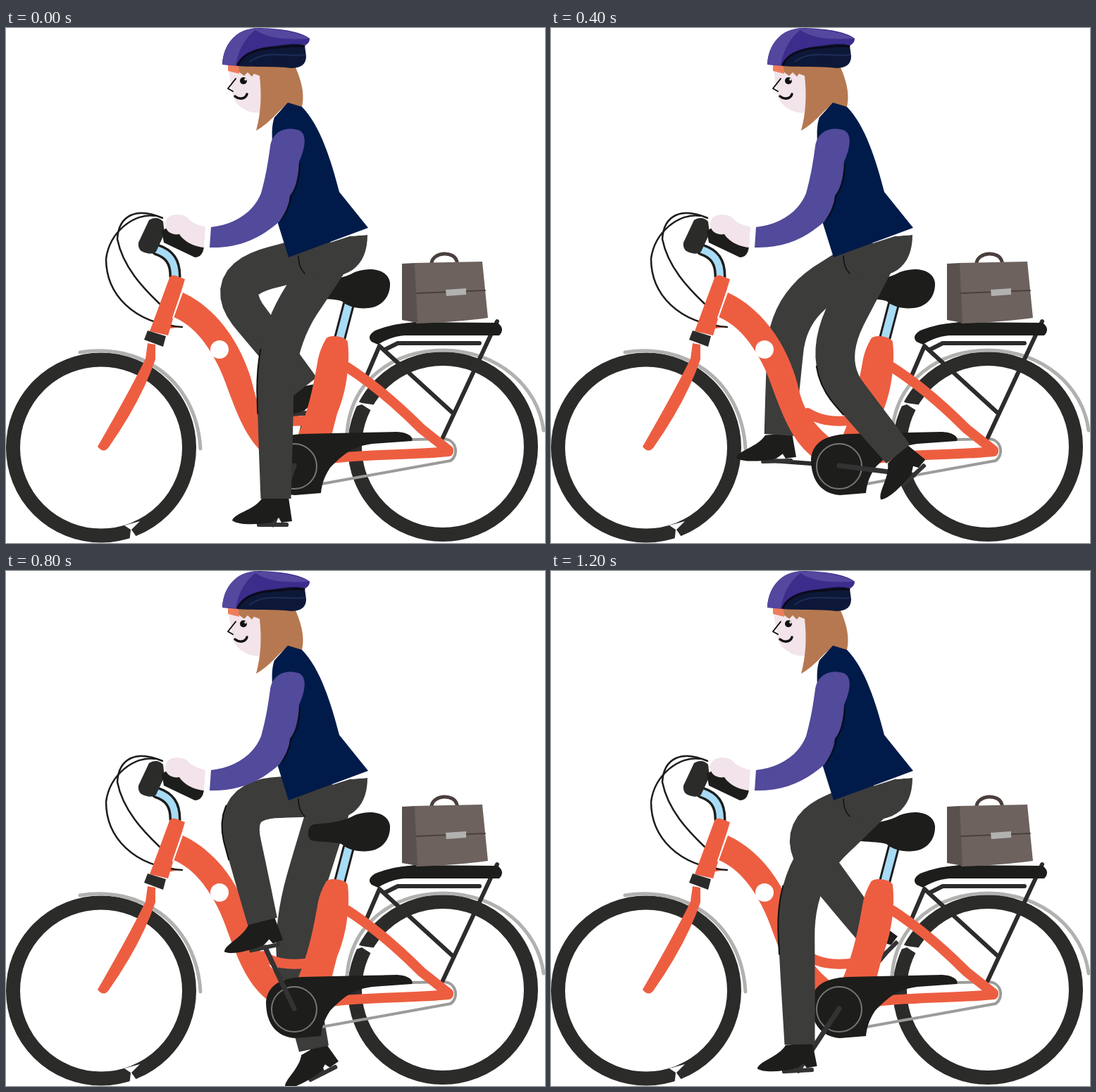
These frames come from a looping animation (765 by 732 pixels, 1250 ms). An HTML page:

```html
<!DOCTYPE html>
<html lang="en">
<head>
<meta charset="utf-8">
<title>Cyclist</title>
<style>
  html, body { margin: 0; height: 100%; overflow: hidden; background: #fff; }
  svg { display: block; width: 765px; height: 732px; }
  .line { fill: none; stroke-linecap: round; stroke-linejoin: round; }
  .trousers { fill: #3c3c3b; }
  .orange { fill: #ed5e41; }
  .black { fill: #1d1d1b; }
</style>
</head>
<body>
<svg viewBox="0 0 765 732">
  <defs>
    <g id="shoe">
      <rect x="-27" y="34" width="45" height="6" rx="2" fill="#333"/>
      <path class="black" d="M-20 0L18 -2L23 32L8 34L4 27L-6 34C-28 37-53 38-62 31C-58 20-32 17-20 0Z"/>
    </g>
  </defs>

  <!-- wheels and mudguards -->
  <g class="line" stroke="#2b2b2a" stroke-width="20">
    <circle cx="135" cy="596.500" r="125"/>
    <circle cx="620" cy="595" r="125"/>
  </g>
  <path fill="#fff" d="M168 707L190 701L178 713L185 723L175 732L177 713ZM492 528L505 533L526 536L519 544L505 535L490 540Z"/>
  <g class="line" stroke="#b1b1b0" stroke-width="5">
    <path d="M105 461C187 447 270 497 276 598"/>
    <path d="M484 575C490 500 550 458 622 458C700 460 755 510 763 572"/>
  </g>

  <g id="far"><path class="line crank" stroke="#2b2b2a" stroke-width="6"/><use href="#shoe"/><path class="trousers leg"/></g>

  <!-- chain, rack and bag -->
  <path class="line" stroke="#9b9b9a" stroke-width="4" d="M575 585L620 584C640 584 643 607 631 615L448 648"/>
  <g class="line" stroke="#2e2b2b" stroke-width="6">
    <path d="M530 452L512 494M530 452L635 548M697 417L620 582M538 457L556 448L672 448"/>
  </g>
  <path class="black" d="M519 446Q511 438 524 430C550 420 565 420 580 418L698 419Q709 428 700 437L565 437C550 438 535 445 528 450Z"/>
  <path class="line" stroke="#4a3f3d" stroke-width="5" d="M604 334C606 318 636 316 640 332"/>
  <path fill="#6d625e" d="M579 334L676 332L684 412Q640 418 582 420Z"/>
  <path fill="#5a514e" d="M562 335L580 334L584 419L562 415Z"/>
  <path class="line" stroke="#4a403e" stroke-width="2" d="M582 377L680 373"/>
  <path fill="#b1b1b0" d="M624 372L653 370L653 379L625 381Z"/>

  <!-- frame -->
  <g class="line" stroke="#ed5e41" stroke-width="14">
    <path d="M484 482C520 505 560 540 590 570L628 600"/>
    <path d="M462 612C520 605 580 607 628 602"/>
    <path d="M364 547C382 558 400 560 424 558"/>
  </g>
  <path class="orange" d="M251 376C295 396 328 440 345 490C355 518 352 545 395 582L374 612C345 590 332 560 314 511C300 470 275 426 238 411Z"/>
  <g class="line">
    <path stroke="#1d1d1b" stroke-width="17" d="M486 394L474 440"/>
    <path stroke="#a8dbf5" stroke-width="11" d="M486 394L474 440"/>
  </g>
  <path class="orange" d="M454 442C458 435 482 438 485 446C489 480 482 520 470 548L462 579L414 580C430 540 436 510 443 470Q446 456 454 442Z"/>
  <circle cx="303" cy="457" r="13" fill="#fff"/>
  <path class="black" d="M437 360C427 362 426 380 434 383C450 386 462 384 476 388C485 396 500 400 515 398C535 396 546 380 545 362C543 345 520 338 495 347C480 356 460 358 437 360Z"/>
  <path class="black" d="M369 612C372 588 390 579 420 577L555 574C572 575 579 582 576 587L520 591C490 595 478 607 460 625C450 640 448 652 447 661L410 664C385 662 369 645 369 612Z"/>
  <circle class="line" cx="409" cy="623" r="32" stroke="#777" stroke-width="2"/>

  <!-- steering -->
  <path class="orange" d="M229 420L248 425L227 428Z"/>
  <g class="line" stroke="#1d1d1b" stroke-width="2.500">
    <path d="M212 267C182 262 147 290 142 328C142 378 180 420 250 425"/>
    <path d="M222 270C185 254 160 266 158 300C166 340 195 370 218 392"/>
    <path stroke-width="17" d="M214 315C232 321 240 332 240 353"/>
    <path stroke="#a8dbf5" stroke-width="10" d="M214 315C232 321 240 332 240 353"/>
  </g>
  <path class="orange" d="M232 355Q235 350 241 352L254 357L230 437L204 431Z"/>
  <path class="line" stroke="#fff" stroke-width="2" d="M249 377L237 412"/>
  <path class="orange" d="M201 448L212 450L212 471Q192 530 145 597Q138 605 130 595Q176 515 198 470Z"/>
  <path fill="#2b2b2a" d="M201 430L227 438L223 453L196 443ZM203 273Q214 266 223 275L225 292L213 318Q206 324 192 317Q187 313 188 305Z"/>
  <path class="black" d="M221 288L240 278L281 311Q279 326 268 326L224 305Z"/>

  <g id="near"><path class="line crank" stroke="#333" stroke-width="7"/><use href="#shoe"/><path class="trousers leg"/><path class="line edge" stroke="#111" stroke-width="2"/></g>

  <!-- rider -->
  <path class="trousers" d="M401 324L488 296L513 294C513 325 500 346 472 352C445 352 425 350 416 345Z"/>
  <path class="line" stroke="#111" stroke-width="1.500" d="M415 324Q415 340 424 349"/>
  <path fill="#fff" d="M514 284L513 294L488 296Z"/>
  <path fill="#f2e4ea" d="M228 272C232 264 250 263 258 270C262 276 272 280 283 283L281 312C262 310 250 300 246 293C230 296 222 282 228 272Z"/>
  <path fill="#f2e4ea" d="M316 60L322 98C328 112 345 123 362 120L366 60Z"/>
  <path fill="#b67850" d="M330 52L410 54C422 80 424 100 419 116L400 108C385 118 375 135 355 146C362 120 363 95 360 68L352 65L349 69L343 63L338 68L330 62Z"/>
  <path fill="#ee7d5c" d="M315 52L330 52L331 65L315 61Z"/>
  <path fill="#001b49" d="M378 165C377 145 378 135 381 127L400 106L420 112C446 138 462 190 473 233L514 284L401 326L386 278Z"/>
  <path class="line" stroke="#080f20" stroke-width="4" d="M416 194C416 212 411 228 404 238Q402 255 390 272"/>
  <path fill="#524a9a" d="M291 283C320 280 350 265 362 235C369 210 372 190 375 168C378 148 395 139 415 145C428 150 425 170 416 190C415 215 410 230 403 238Q402 255 388 275C360 300 330 313 289 312Z"/>
  <path class="line" stroke="#111" stroke-width="2" d="M326 72L315 86L322 90"/>
  <circle cx="337" cy="75" r="5" fill="#111"/>
  <circle cx="340" cy="73" r="1.800" fill="#f2e4ea"/>
  <path class="line" stroke="#111" stroke-width="3.500" d="M325 97C331 102 340 101 342 94"/>
  <path fill="#3c2c8c" d="M307 52C308 25 325 0 360 0C395 1 420 6 431 15C431 20 428 23 424 25L410 48L330 54Z"/>
  <path fill="#54479e" d="M307 52C308 25 325 0 358 0C340 12 330 30 326 53ZM352 1C380 0 418 6 431 15C410 16 372 18 352 1Z"/>
  <path fill="#0d1838" d="M328 54C335 38 350 30 370 27C390 25 410 20 424 25L426 40C426 52 418 57 405 57C380 54 350 56 328 54Z"/>
  <path class="line" stroke="#0a0a1a" stroke-width="3" d="M329 52C336 38 350 32 370 29C392 28 408 24 423 26"/>
  <path class="line" stroke="#1d2c55" stroke-width="2" d="M346 48C370 30 400 42 424 38"/>
</svg>
<script>
const LOOP = 1250, STEP = 50, SAMPLES = 28;
const HIP = [464, 318], AXLE = [409, 622];
const times = [0, 300, 500, 600, 800, 1100, 1200];

// Each pose: knee x, knee y, ankle x, ankle y, shoe angle.
const legs = [
  { id: 'far', phase: -75.5, poses: [
    [305, 359, 424, 510, -8], [320, 369, 343, 531, -3], [362, 425, 323, 628, 0],
    [405, 430, 363, 670, 2], [402, 520, 437, 679, -27], [357, 430, 476, 552, -45],
    [344, 372, 453, 513, -45]] },
  { id: 'near', phase: 104.5, poses: [
    [382, 445, 383, 669, 0], [405, 505, 474, 655, -48], [355, 420, 495, 551, -27],
    [329, 364, 468, 500, -3], [321, 325, 364, 498, -12], [304, 401, 313, 629, -2],
    [346, 435, 353, 673, -3]] }
];

const mix = (a, b, k) => a.map((v, i) => v + (b[i] - v) * k);

// Even circular motion of the ankle; the poses refine it.
function orbit(phase, t) {
  const a = (phase - 360 * t / LOOP) * Math.PI / 180;
  return [0, 0, 405 + 98 * Math.cos(a), 587 + 98 * Math.sin(a), 0];
}

// Periodic cubic through values placed at `times`.
function spline(values, t) {
  const n = times.length;
  const at = i => times[(i + n) % n] + LOOP * Math.floor(i / n);
  const val = i => values[(i + n) % n];
  const slope = i => (val(i + 1) - val(i - 1)) / (at(i + 1) - at(i - 1));
  const i = times.findLastIndex(k => k <= t);
  const h = at(i + 1) - at(i), u = (t - at(i)) / h, v = 1 - u;
  return v * v * (1 + 2 * u) * val(i) + u * u * (3 - 2 * u) * val(i + 1)
    + h * u * v * (v * slope(i) - u * slope(i + 1));
}

for (const leg of legs) {
  const group = document.getElementById(leg.id);
  for (const name of ['crank', 'leg', 'edge']) leg[name + 'Path'] = group.querySelector('.' + name);
  leg.shoe = group.querySelector('use');
  const offsets = leg.poses.map((pose, i) => {
    const base = orbit(leg.phase, times[i]);
    return pose.map((v, j) => v - base[j]);
  });
  leg.channels = leg.poses[0].map((_, j) => offsets.map(o => o[j]));
}

// Front and back sides of a tapered leg bent around the knee.
function outline(knee, ankle) {
  const start = mix(HIP, knee, .55), end = mix(knee, ankle, .35);
  const point = s => {
    if (s < .3) return mix(HIP, start, s / .3);
    if (s > .7) return mix(end, ankle, (s - .7) / .3);
    const k = (s - .3) / .4;
    return mix(mix(start, knee, k), mix(knee, end, k), k);
  };
  const front = [], back = [];
  for (let i = 0; i <= SAMPLES; i++) {
    const s = i / SAMPLES, [x, y] = point(s);
    const a = point(Math.max(0, s - .01)), b = point(Math.min(1, s + .01));
    const dx = b[0] - a[0], dy = b[1] - a[1], w = (30 - 8.5 * s * s) / Math.hypot(dx, dy);
    front.push([x - dy * w, y + dx * w]);
    back.push([x + dy * w, y - dx * w]);
  }
  return [front, back];
}

const toPath = points => 'M' + points.map(p => p.map(v => v.toFixed(1)).join(' ')).join('L');

function drawLeg(leg, t) {
  const base = orbit(leg.phase, t);
  const [kx, ky, ax, ay, turn] = leg.channels.map((c, j) => spline(c, t) + base[j]);
  const r = turn * Math.PI / 180, c = Math.cos(r), s = Math.sin(r);
  const pedal = [ax - 4 * c - 37 * s, ay - 4 * s + 37 * c];
  const [front, back] = outline([kx, ky], [ax, ay]);
  leg.crankPath.setAttribute('d', toPath([AXLE, pedal]));
  leg.shoe.setAttribute('transform', `translate(${ax} ${ay}) rotate(${turn})`);
  leg.edgePath?.setAttribute('d', toPath(front.slice(15, 22)));
  leg.legPath.setAttribute('d', toPath([...front, ...back.reverse()]) + 'Z');
}

function draw() {
  const t = Math.floor(performance.now() % LOOP / STEP) * STEP;
  for (const leg of legs) drawLeg(leg, t);
  requestAnimationFrame(draw);
}
draw();
</script>
</body>
</html>
```
